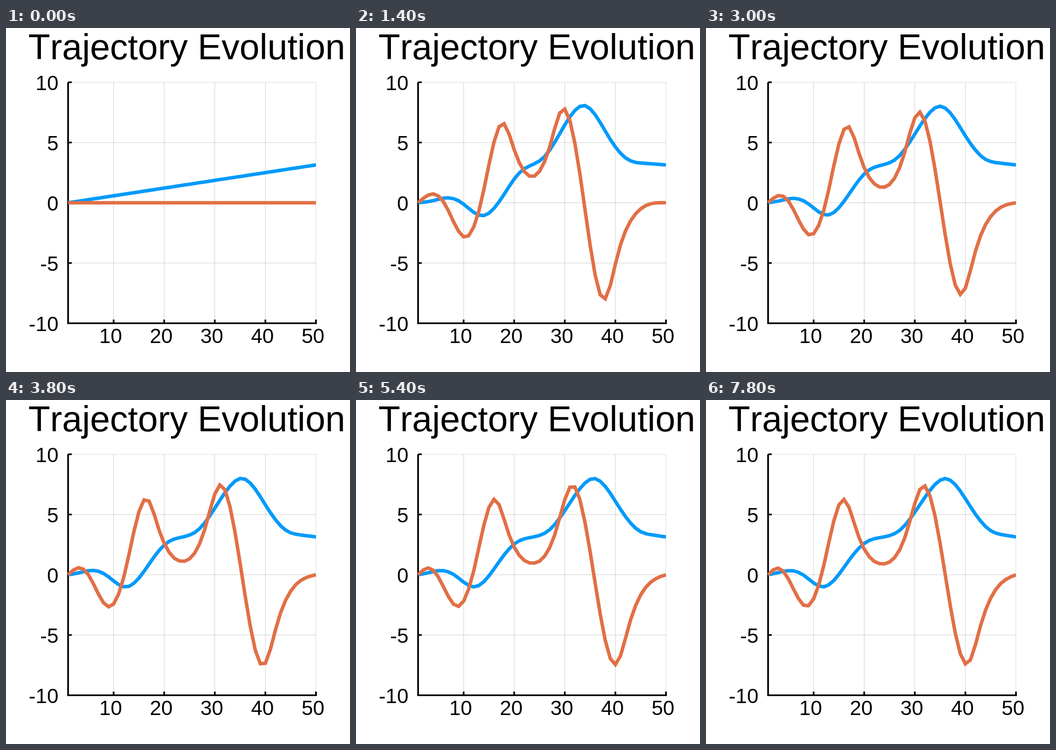
Animation of 748 by 748 pixels, one loop 8000 ms. Source, as an HTML page:

```html
<!DOCTYPE html>
<html lang="en">
<head>
<meta charset="utf-8">
<title>Trajectory Evolution</title>
<style>
  html, body { margin: 0; width: 100%; height: 100%; overflow: hidden; background: #fff; }
  svg { display: block; width: 100%; height: 100%; }
  text { font-family: "Liberation Sans", Arial, sans-serif; font-size: 44.7px; font-kerning: none; }
  .title { font-size: 78px; }
  .grid { stroke: #000; stroke-opacity: .1; stroke-width: 2; }
  .axis { stroke: #000; stroke-width: 3.7; fill: none; }
  .curve { fill: none; stroke-width: 7.6; stroke-linejoin: miter; }
</style>
</head>
<body>
<svg viewBox="0 0 748 748">
  <clipPath id="plot"><rect x="134" y="117.5" width="540.5" height="525"/></clipPath>
  <text class="title" x="48.4" y="68.4">Trajectory Evolution</text>
  <g id="grid" class="grid" clip-path="url(#plot)"></g>
  <path id="axes" class="axis"/>
  <g id="xLabels" text-anchor="middle"></g>
  <g id="yLabels" text-anchor="end"></g>
  <g clip-path="url(#plot)">
    <path id="angle" class="curve" stroke="#009afa"/>
    <path id="speed" class="curve" stroke="#e26f46"/>
  </g>
</svg>
<script>
const STEP = 200, STEPS = 40, COUNT = 50, GROW_STEPS = 3;
const el = id => document.getElementById(id);
const px = k => 135 + (k - 1) * 11;
const py = v => 380 - v * 26.2;
const mix = (a, b, t) => a + (b - a) * t;

// A turning point, crossing or shoulder that drifts from (x0, y0) to (x1, y1).
const key = (x0, x1, y0, y1 = y0) => (drift, settle) => [mix(x0, x1, drift), mix(y0, y1, settle)];

const speed = {
  end: 0,
  keys: [
    key(5, 2.9, .97, .56),
    key(7.45, 4.53, 0),
    key(11.8, 8.6, -3.23, -2.62),
    key(14.9, 11.57, 0),
    key(19.3, 16, 7.1, 6.25),
    key(21, 18.5, 5.77, 3.65),
    key(23.4, 23.5, 3.95, .9),
    key(26, 28.5, 6.3, 3.68),
    key(27.9, 31.7, 8.35, 7.4),
    key(32.05, 36.02, 0),
    key(35.9, 40.45, -8.85, -7.4),
    key(38, 43, -5.4, -4.23),
    key(42, 46.5, -.88, -.95)
  ]
};
const angle = {
  end: Math.PI,
  keys: [
    key(5, 3, .2, .18),
    key(8, 5.4, .5, .35),
    key(11, 7.9, 0),
    key(15.4, 12, -1.17, -1),
    key(19.9, 16.65, 1),
    key(22, 20, 2.42, 2.6),
    key(25, 27, 3.92, 3.68),
    key(29, 32.9, 6.95),
    key(32, 36.2, 8.2, 7.98),
    key(36.4, 41, 5.62, 5.65),
    key(40, 45, 3.66),
    key(44, 47.5, 3.24, 3.31)
  ]
};

// Natural cubic spline through the points, evaluated at every integer from 1 to COUNT.
function spline(points) {
  const n = points.length, m = Array(n).fill(0), c = Array(n).fill(0);
  const xs = points.map(p => p[0]), ys = points.map(p => p[1]);
  for (let i = 1; i < n - 1; i++) {
    const a = xs[i] - xs[i - 1], b = xs[i + 1] - xs[i];
    const d = 2 * (a + b) - a * c[i - 1];
    const r = 6 * ((ys[i + 1] - ys[i]) / b - (ys[i] - ys[i - 1]) / a);
    c[i] = b / d;
    m[i] = (r - a * m[i - 1]) / d;
  }
  for (let i = n - 2; i > 0; i--) m[i] -= c[i] * m[i + 1];
  return Array.from({ length: COUNT }, (_, j) => {
    const x = j + 1;
    let i = 0;
    while (i < n - 2 && x > xs[i + 1]) i++;
    const h = xs[i + 1] - xs[i], t = (x - xs[i]) / h, u = 1 - t;
    return u * ys[i] + t * ys[i + 1] + h * h / 6 * ((u ** 3 - u) * m[i] + (t ** 3 - t) * m[i + 1]);
  });
}

// Stretched exponential convergence; heights settle sooner than positions.
const approach = n => 1 - Math.exp(-.19 * n ** .75);
function easing(step) {
  const left = 1 - Math.min(step / GROW_STEPS, 1);
  const drift = approach(Math.max(step - GROW_STEPS, 0)) / approach(STEPS - 1 - GROW_STEPS);
  return { grown: 1 - left ** 2, drift, settle: 1 - (1 - drift) ** 1.5 };
}

function curvePath({ keys, end }, { grown, drift, settle }) {
  const values = spline([[1, 0], ...keys.map(k => k(drift, settle)), [COUNT, end]]);
  return "M" + values.map((v, j) => {
    const straight = end * j / (COUNT - 1);
    return px(j + 1).toFixed(2) + " " + py(mix(straight, v, grown)).toFixed(2);
  }).join("L");
}

function buildAxes() {
  let grid = "", xText = "", yText = "", d = "M135 118V642H676";
  for (let k = 10; k <= 50; k += 10) {
    const x = px(k);
    grid += `<path d="M${x} 118V642"/>`;
    d += `M${x} 642V634`;
    xText += `<text x="${x - 6.5}" y="685">${k}</text>`;
  }
  for (let v = -10; v <= 10; v += 5) {
    const y = py(v);
    grid += `<path d="M135 ${y}H674"/>`;
    d += `M135 ${y}H143`;
    yText += `<text x="114" y="${y + 16.5}">${v}</text>`;
  }
  el("grid").innerHTML = grid;
  el("axes").setAttribute("d", d);
  el("xLabels").innerHTML = xText;
  el("yLabels").innerHTML = yText;
}

let shown = -1;
function draw() {
  const step = Math.floor(performance.now() / STEP) % STEPS;
  if (step !== shown) {
    shown = step;
    const pose = easing(step);
    el("angle").setAttribute("d", curvePath(angle, pose));
    el("speed").setAttribute("d", curvePath(speed, pose));
  }
  requestAnimationFrame(draw);
}

buildAxes();
draw();
</script>
</body>
</html>
```
